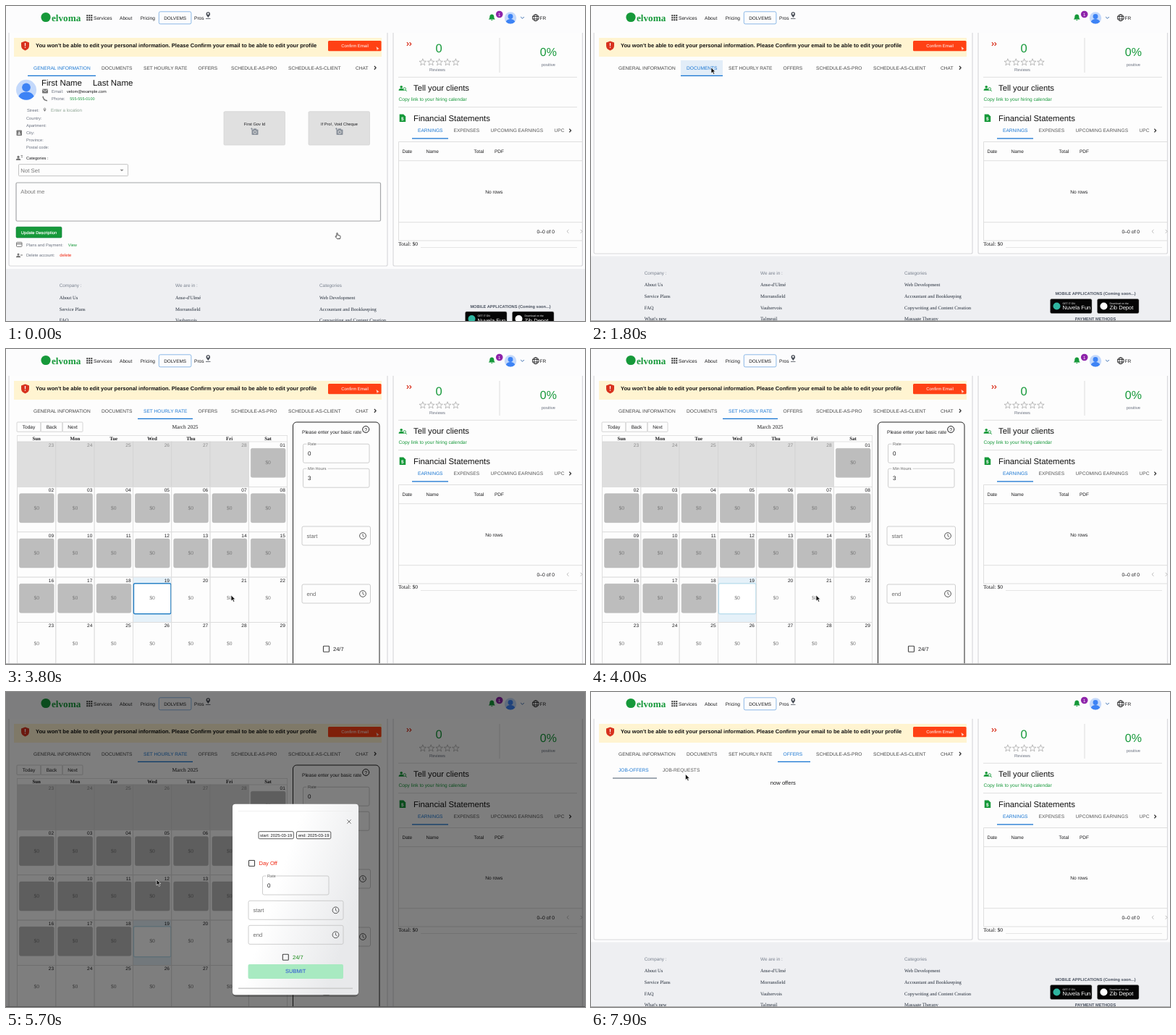
These frames come from a looping animation (800x435 px, 8 s). An HTML page:

```html
<!DOCTYPE html>
<html lang="en">
<head>
<meta charset="utf-8">
<title>Profile page</title>
<style>
html, body { margin: 0; width: 100%; height: 100%; overflow: hidden; background: #fcfcfd; }
svg { display: block; width: 100vw; height: 100vh; font-family: "Liberation Sans", Arial, sans-serif; text-rendering: geometricPrecision; }
.serif { font-family: "Liberation Serif", "Times New Roman", serif; }
</style>
</head>
<body>
<svg id="stage" viewBox="0 0 800 435"></svg>
<script>
const GREEN = "#16993a", BLUE = "#1976d2", INK = "#1c1c1e", GREY = "#6b7280";
const LOOP = 8000;

// Drawing helpers
const text = (x, y, s, size, fill = INK, extra = "") =>
  `<text x="${x}" y="${y}" font-size="${size}" fill="${fill}" ${extra}>${s}</text>`;
const mid = (x, y, s, size, fill, extra = "") => text(x, y, s, size, fill, `text-anchor="middle" ${extra}`);
const serif = (x, y, s, size, fill, extra = "") => text(x, y, s, size, fill, `class="serif" ${extra}`);
const box = (x, y, w, h, fill = "none", stroke = "none", r = 0, sw = 1) =>
  `<rect x="${x}" y="${y}" width="${w}" height="${h}" rx="${r}" fill="${fill}" stroke="${stroke}" stroke-width="${sw}"/>`;
const dot = (x, y, r, fill, stroke = "none", sw = 1) =>
  `<circle cx="${x}" cy="${y}" r="${r}" fill="${fill}" stroke="${stroke}" stroke-width="${sw}"/>`;
const line = (d, stroke = "#ddd", sw = 1) => `<path d="${d}" fill="none" stroke="${stroke}" stroke-width="${sw}"/>`;
const shape = (d, fill) => `<path d="${d}" fill="${fill}"/>`;
const group = (id, inner, extra = "") => `<g id="${id}" ${extra}>${inner}</g>`;
const range = n => [...Array(n).keys()];

// Icons
const chevron = (x, y, w, h, color, sw = 1.3) => line(`M${x - w} ${y - h}l${2 * w} ${h}l${-2 * w} ${h}`, color, sw);
const pin = (x, y, s, color) => dot(x, y - s * .2, s * .45, "none", color, s * .32) +
  shape(`M${x - s * .6} ${y}h${s * 1.2}l${-s * .6} ${s}z`, color);
const person = (x, y, s, color) => dot(x, y - s * .5, s * .5, color) +
  shape(`M${x - s} ${y + s * .9}q0 ${-s * .8} ${s} ${-s * .8}t${s} ${s * .8}z`, color);
const avatar = (x, y, r) => dot(x, y, r, "#c4d9fb") + dot(x, y - r * .25, r * .42, "#3d83f5") +
  shape(`M${x - r * .76} ${y + r * .64}q${r * .2} ${-r * .45} ${r * .76} ${-r * .45}t${r * .76} ${r * .45}a${r} ${r} 0 0 1 ${-r * 1.52} 0`, "#3d83f5");
const clock = (x, y) => dot(x, y, 4.4, "none", "#555", 1) + line(`M${x} ${y - 2.8}v3l2 1.4`, "#555", .9);
const camera = (x, y) => box(x - 4.5, y - 3, 9, 7.5, "#8b929c", "none", 1) + box(x - 2, y - 4.2, 4, 2, "#8b929c") +
  dot(x, y + .8, 2, "none", "#e0e0e0", .9) + line(`M${x - 6} ${y - 4}h3m-1.5 -1.5v3`, "#8b929c", .8);
const star = (x, y) => line("M" + range(10).map(i => {
  const a = i * Math.PI / 5, r = i % 2 ? 2.1 : 5;
  return `${(x + r * Math.sin(a)).toFixed(2)} ${(y - r * Math.cos(a)).toFixed(2)}`;
}).join("L") + "z", "#a0a0a0", .7);
const check = (x, y) => box(x, y, 8, 8, "none", "#444", .8, 1.1);
const field = (x, y, w, label, value) => box(x, y, w, 26, "none", "#c2c2c2", 2, .8) +
  box(x + 5, y - 2, label.length * 3 + 2, 4, "#fdfdfd") + text(x + 6.5, y + 1.8, label, 5.6, "#666") + text(x + 6.5, y + 16, value, 8);
const timeField = (x, y, w, label) => box(x, y, w, 26, "none", "#c2c2c2", 2, .8) +
  text(x + 6.5, y + 15.7, label, 7.7, "#6a6a6a") + clock(x + w - 10.5, y + 13);

const tabs = [
  { x: 30, w: 94, tx: 38, name: "GENERAL INFORMATION" },
  { x: 124, w: 58, tx: 132, name: "DOCUMENTS" },
  { x: 182, w: 76, tx: 190, name: "SET HOURLY RATE" },
  { x: 258, w: 45, tx: 265.5, name: "OFFERS" },
  { x: 303, w: 80, tx: 311, name: "SCHEDULE-AS-PRO" },
  { x: 382, w: 89, tx: 390, name: "SCHEDULE-AS-CLIENT" },
  { x: 475, w: 30, tx: 483, name: "CHAT" }
];

function header() {
  const grid = range(9).map(i => box(111.3 + i % 3 * 3, 12.2 + (i / 3 | 0) * 3, 2, 2, "#333")).join("");
  return dot(55, 15.5, 6.6, GREEN) + serif(63, 20.5, "elvoma", 13.2, GREEN, 'font-weight="bold"') +
    grid + text(121, 18.6, "Services", 6.65) + text(157, 18.6, "About", 6.6) + text(185.7, 18.6, "Pricing", 6.6) +
    box(211.3, 7.8, 44.6, 17, "none", "#7fb2e5", 2, .9) + mid(233.6, 18.6, "DOLVEMS", 6.4) +
    text(260, 18.6, "Pros", 6.6) + pin(279.3, 11.8, 4.5, "#4a4f58") + line("M276 17.5h6.5", "#4a4f58", .8) +
    shape("M666.8 18.6q1.5-1 1.5-3.6q0-3 3-3.4q3 .4 3 3.4q0 2.600 1.500 3.600zM670 19.200h2.600q-1.300 2-2.600 0", GREEN) +
    dot(681.7, 11.5, 4.8, "#8e24aa") + mid(681.7, 13.8, "1", 6, "#fff") + avatar(697, 16.5, 8.2) +
    line("M711.2 15l2.300 2.300l2.300-2.300", "#3c6fb0", 1) +
    dot(731.8, 16.2, 4.4, "none", INK, .9) + line("M727.500 14.500h8.600m-8.600 3.400h8.600", INK, .8) +
    `<ellipse cx="731.8" cy="16.2" rx="2" ry="4.4" fill="none" stroke="${INK}" stroke-width=".8"/>` + text(737.6, 18.7, "FR", 6.5);
}

function bannerAndTabs() {
  return box(11, 44, 508, 26, "#fff4d1") +
    shape("M21 50.500l5.500-2l5.500 2v4.500q0 4.500-5.500 6.500q-5.500-2-5.500-6.500z", "#d8321e") +
    line("M26.500 51v4.300m0 1.200v1.300", "#fff", 1.2) +
    text(41, 57, "You won't be able to edit your personal information. Please Confirm your email to be able to edit your profile", 7.55, "#111", 'font-weight="bold"') +
    box(445, 48, 73.600, 14.200, "#ff4114", "none", 1.500) + mid(482, 57.300, "Confirm Email", 6, "#fff") +
    shape("M511.500 56l4.200 3.200l-2 .3l-.8 2z", "#ffd9ce") +
    `<clipPath id="tabClip"><rect id="tabArea" y="75" height="21.500"/></clipPath>` +
    `<circle id="ripple" fill="${BLUE}" clip-path="url(#tabClip)"/>` +
    tabs.map((t, i) => text(t.tx, 87.600, t.name, 6.600, "#555", `id="tab${i}"`)).join("") +
    chevron(510, 85.300, 1.100, 2.400, "#333") +
    `<rect id="indicator" y="95.700" height="1.300" fill="${BLUE}"/>`;
}

function general() {
  const upload = (x, label) => box(x, 145.700, 84.500, 46.300, "#e0e0e0", "#d2d2d2", 1.500, .700) +
    mid(x + 42.500, 164.500, label, 5.700) + camera(x + 43, 173.500);
  const labels = ["Country:", "Apartment:", "City:", "Province:", "Postal code:"];
  return avatar(28, 115.800, 14) + text(49, 110, "First Name", 11.450, "#111") + text(120, 110, "Last Name", 11.450, "#111") +
    box(50, 114.500, 8, 6, "#777", "none", .800) + line("M50.500 115.500l3.500 2.500l3.500-2.500", "#fff", .800) +
    text(63, 119.700, "Email:", 5.900, GREY) + text(84, 119.700, "velom@example.com", 5.700) +
    line("M51 124.800q.5 5.500 6 6", "#777", 1.600) + text(63, 129.700, "Phone:", 5.900, GREY) + text(88.300, 129.700, "555-555-0100", 5.500, GREEN) +
    text(29, 145.500, "Street:", 5.700, GREY) + pin(53.500, 143, 3, "#888") + text(62, 145.600, "Enter a location", 6.200, "#90a796") +
    labels.map((s, i) => text(28, 157 + i * 9.900, s, 5.700, GREY)).join("") +
    box(14.500, 171.500, 7.500, 7.500, "#777", "none", .800) + person(18.200, 175.500, 2.100, "#fff") +
    person(17, 210, 3.200, "#777") + line("M20.500 206.500h2.500m-2 2h2", "#777", .900) +
    text(28, 211.500, "Categories :", 5.660) +
    box(17.500, 218.700, 151, 16, "none", "#bdbdbd", 1, .900) + text(20.300, 229.500, "Not Set", 7.800, "#777") + shape("M157.500 225.800h5l-2.500 2.500z", "#888") +
    box(14, 244, 503.500, 53, "#fdfdfd", "#a4a6a8", 1.500, 1.200) + text(20.300, 259.300, "About me", 7.700, "#777") +
    box(14, 305, 63, 15, GREEN, "#0c7a3c", 1.500, .600) + mid(45.500, 314.600, "Update Description", 5.800, "#fff", 'stroke="#fff" stroke-width=".15"') +
    box(14.500, 326.300, 7.500, 6, "none", "#777", .800, 1) + line("M14.500 328.500h7.500", "#777", 1.300) +
    text(28, 331.700, "Plans and Payment:", 5.700, GREY) + text(85.700, 331.700, "View", 5.700, GREEN) +
    person(17, 344.500, 3, "#777") + line("M20 344h3", "#777", 1) +
    text(28, 346.300, "Delete account:", 5.700, GREY) + text(74.300, 346.300, "delete", 5.900, "#f0220c") +
    upload(301, "First Gov Id") + upload(418, "If Pro!, Void Cheque");
}

function calendar() {
  const left = 15.500, top = 128, cw = 53.300, rh = 62.350;
  const two = n => String(n).padStart(2, "0");
  let out = ["Today", "Back", "Next"].map((s, i) => {
    const x = [15, 48, 78, 106];
    return box(x[i], 101, x[i + 1] - x[i], 13.300, "none", "#ccc", 1, .800) + mid((x[i] + x[i + 1]) / 2, 109.800, s, 6.600);
  }).join("");
  out += mid(247.500, 109.700, "March 2025", 7.450, INK, 'class="serif"');
  for (const i of range(35)) {
    const col = i % 7, row = i / 7 | 0, x = left + col * cw, y = top + row * rh;
    const outside = i < 6, today = i === 24, past = i >= 6 && i < 24;
    const day = outside ? 23 + i : i - 5;
    out += box(x, y, cw, rh, outside ? "#dedede" : today ? "#e5f1f9" : "none", outside ? "#d2d2d2" : "#ddd", 0, .800);
    out += text(x + cw - 2.800, y + 6.800, two(day), 6.500, outside ? "#888" : INK, 'text-anchor="end"');
    if (past) out += box(x + 3, y + 9.300, 47.700, 40, "#bdbdbd", "#b2b2b2", 2, .500);
    if (today) out += `<rect id="today" x="${x + 1}" y="${y + 8.800}" width="51.500" height="42" rx="2" fill="#fff" stroke-width="1.500"/>`;
    if (!outside) out += mid(x + cw / 2, y + 31.300, "$0", 7.500, "#777", 'class="serif"');
  }
  out += box(left, 119.500, cw * 7, 320, "none", "#ddd", 0, .800);
  out += ["Sun", "Mon", "Tue", "Wed", "Thu", "Fri", "Sat"].map((s, i) =>
    mid(left + (i + .5) * cw, 126, s, 6.900, INK, 'class="serif" font-weight="bold"')).join("");
  return out + box(396.500, 101, 119.500, 400, "none", "#222", 5) +
    text(409, 116.500, "Please enter your basic rate", 6.600) +
    dot(497.200, 111, 4.500, "none", INK, 1) + mid(497.200, 113.700, "?", 7) +
    field(410.500, 131.200, 91.500, "Rate", "0") + field(410.500, 165.200, 91.500, "Min Hours", "3") +
    timeField(409, 245, 94.500, "start") + timeField(409, 325, 94.500, "end") +
    check(438.500, 410.300) + text(452, 417.200, "24/7", 7.500);
}

function offers() {
  return text(38, 110.200, "JOB-OFFERS", 6.600, BLUE) + text(99, 110.200, "JOB-REQUESTS", 6.600, "#555") +
    box(30, 118.500, 61, 1, "#45566b") + mid(265.300, 127.600, "now offers", 7.600);
}

function rightPanel() {
  return [555, 558.700].map(x => chevron(x, 52.500, 1.100, 2.400, "#d8321e", 1.200)).join("") +
    mid(598, 63.800, "0", 16.500, GREEN) + range(5).map(i => star(575.800 + i * 11.400, 77.800)).join("") +
    mid(596, 89.600, "Reviews", 5.800, GREY) + line("M682 44v48") +
    mid(749.300, 69, "0%", 16, GREEN) + mid(749.300, 83.300, "positive", 5.700, GREY) +
    line("M542 98.300h247M542 139.700h247", "#ddd", .900) +
    person(546.200, 113.500, 3.600, GREEN) + dot(550.700, 114.500, 1.800, "#fdfdfd", GREEN, .900) + line("M552 116l1.700 1.700", GREEN, 1) +
    text(563, 117, "Tell your clients", 11.250, "#111") + text(542.500, 131, "Copy link to your hiring calendar", 6.600, GREEN) +
    shape("M543.700 149.500h5.500l3 3v7.500h-8.500z", GREEN) + mid(547.900, 158, "$", 6.500, "#fff", 'font-weight="bold"') +
    text(563, 158.600, "Financial Statements", 11.350, "#111") +
    text(569, 174, "EARNINGS", 6.600, BLUE) + text(618.500, 174, "EXPENSES", 6.600, "#555") +
    text(669.500, 174, "UPCOMING EARNINGS", 6.600, "#555") + text(757.500, 174, "UPC", 6.600, "#555") +
    chevron(779.500, 172, 1.100, 2.400, "#333") + box(561, 182.300, 50, 1.300, BLUE) +
    line("M797 187.500h-254.500v136.500h254.500M542.500 213.700h254.500M542.500 298.700h254.500", "#dcdcdc", .900) +
    [["Date", 547.500], ["Name", 580.500], ["Total", 646.500], ["PDF", 675]].map(([s, x]) => text(x, 203, s, 6.500)).join("") +
    mid(674.300, 259, "No rows", 6.600) + text(733.500, 313.700, "0–0 of 0", 6.800) +
    line("M777.500 308.900l-2.500 2.400l2.500 2.400", "#bbb", 1) + chevron(795, 311.300, 1.200, 2.400, "#bbb", 1) +
    serif(542, 331, "Total: $0", 7.550) + line("M573 333.500h216", "#e0e0e0", .800);
}

function footer() {
  const columns = [
    [73.700, "Company :", "About Us", "Service Plans", "FAQ", "What's new"],
    [234, "We are in :", "Anse-d'Ulmé", "Morransfield", "Vauhervois", "Talmeuil"],
    [433, "Categories", "Web Development", "Accountant and Bookkeeping", "Copywriting and Content Creation", "Massage Therapy"]
  ];
  const badge = (x, small, name, mark) => box(x, 422, 57.500, 20, "#050505", "#888", 2, .500) + dot(x + 9, 432, 5, mark) +
    text(x + 17, 429, small, 3.500, "#fff") + text(x + 17, 436.800, name, 7.600, "#fff");
  return box(0, 363, 800, 100, "#eeeff2") + columns.map(([x, title, ...items]) =>
    text(x, 388.300, title, 6.400, "#7a828f") + items.map((s, i) => serif(x, 404.800 + i * 15.700, s, 6.650, "#222b38")).join("")).join("") +
    mid(697, 416.600, "MOBILE APPLICATIONS (Coming soon...)", 5.660, "#4a5260", 'font-weight="bold"') +
    badge(634.500, "GET IT ON", "Nuvela Fun", "#2fb5a0") + badge(699.500, "Download on the", "Zib Depot", "#fff") +
    mid(697, 451.700, "PAYMENT METHODS", 5.660, "#4a5260", 'font-weight="bold"');
}

function modal() {
  return box(0, 0, 800, 435, "rgba(0,0,0,.5)") + box(313, 157, 174, 264, "rgba(0,0,0,.25)", "none", 5) +
    box(313, 154.700, 174, 263.500, "url(#paper)", "none", 4) +
    line("M471.300 176.300l5.400 5.400m0-5.400l-5.400 5.400", "#777", 1) + line("M321 164.500h158", "#eee", .800) +
    [[349, 48.300, "start"], [401.500, 47.300, "end"]].map(([x, w, s]) => box(x, 192.700, w, 10, "none", "#333", 1.500, .800) +
      mid(x + w / 2, 199.800, "", 5.800, INK, `id="${s}Date"`)).join("") +
    check(335.500, 232.500) + text(349.500, 239.200, "Day Off", 7.500, "#f0220c") +
    field(354.500, 254, 91.500, "Rate", "0") + timeField(335, 288.300, 131, "start") + timeField(335, 322.300, 131, "end") +
    check(382.300, 362.200) + text(396, 369, "24/7", 7.500, "#178a17") +
    box(334.500, 376, 131.500, 20, "#a8eac1", "none", 2) + mid(400.200, 388.300, "SUBMIT", 7.500, "#2348d6") + box(321, 408.500, 158, 1.600, "#ccc");
}

const stage = document.getElementById("stage");
const panel = (id, x, w) => `<rect id="${id}" x="${x}" y="30" width="${w}" rx="2" fill="#fdfdfd" stroke="#d9d9dc" stroke-width="1.200"/>`;
stage.innerHTML = `<defs>
  <linearGradient id="paper" x2="1" y2=".5"><stop offset=".45" stop-color="#fff"/><stop offset="1" stop-color="#e8e9eb"/></linearGradient>
  <clipPath id="leftClip"><rect x="4" y="36" width="523" height="400"/></clipPath></defs>` +
  box(0, 0, 800, 435, "#fcfcfd") + panel("leftPanel", 4, 523) + panel("rightPanel", 535, 261.500) +
  box(0, 0, 800, 37, "#fcfcfd") + header() +
  `<g clip-path="url(#leftClip)">` + group("general", general()) + group("calendar", calendar()) + group("offers", offers()) + `</g>` +
  bannerAndTabs() + rightPanel() + group("footer", footer()) +
  group("bottomLine", box(0, 434, 800, 1, "#aaa")) + group("modal", modal()) +
  group("arrow", shape("M0 0v8l1.900-1.700l1.400 3l1.400-.7l-1.400-2.900h2.500z", "#111"), 'stroke="#fff" stroke-width=".6"') +
  group("hand", `<path d="M-1.500 7.500l-1.500-2.300q.5-1 1.800.1v-4.500q.8-1 1.500 0v2.500l3 .8q1 .3.800 1.500l-.6 2.900h-4z" fill="#fff" stroke="#222" stroke-width=".8"/>`);

const el = id => document.getElementById(id);
const set = (id, attrs) => { for (const k in attrs) el(id).setAttribute(k, attrs[k]); };
const show = (id, on) => set(id, { display: on ? "inline" : "none" });
const clamp = v => Math.max(0, Math.min(1, v));
const smooth = v => (v = clamp(v), v * v * (3 - 2 * v));
const mix = (a, b, p) => a + (b - a) * p;

// Timeline: tab selections, dialogs and pointer stops
const picks = [[-1000, 0], [1500, 1], [2420, 2], [6800, 3]];
const dialogs = [[4000, 4500, "2025-03-21"], [5300, 5900, "2025-03-19"]];
const stops = [[0, 458, 313], [350, 458, 313], [1050, 174, 86], [1600, 166, 85], [1850, 166, 85], [2350, 212, 84.500],
  [2700, 212, 84.500], [3700, 311, 340], [4000, 311, 340], [4400, 247, 305], [4800, 247, 305], [5200, 204, 340],
  [5300, 204, 340], [5650, 208, 259], [5900, 208, 259], [6650, 279, 84], [6950, 279, 84], [7850, 130.500, 113.500], [LOOP, 130.500, 113.500]];

function pointer(t) {
  const i = stops.findIndex((s, k) => k && t <= s[0]);
  const [t0, x0, y0] = stops[i - 1], [t1, x1, y1] = stops[i];
  const p = smooth((t - t0) / (t1 - t0));
  return `translate(${mix(x0, x1, p)} ${mix(y0, y1, p)})`;
}

function settle(id, p) {
  const s = 1.1 - .1 * p;
  set(id, { opacity: p, transform: `translate(265 283) scale(${s}) translate(-265 -283)` });
}

function draw(t) {
  let n = 0;
  picks.forEach(([start], i) => { if (t >= start) n = i; });
  const [start, active] = picks[n];
  const tab = tabs[active], from = tabs[picks[Math.max(0, n - 1)][1]];
  const age = t - start, slide = 1 - Math.pow(1 - clamp(age / 300), 2.3);
  set("indicator", { x: mix(from.x, tab.x, slide), width: mix(from.w, tab.w, slide) });
  tabs.forEach((_, i) => set("tab" + i, { fill: i === active ? BLUE : "#444" }));
  set("tabArea", { x: tab.x, width: tab.w });
  set("ripple", { cx: tab.x + 31, cy: 88, r: 80 * smooth(age / 350), opacity: n ? .14 * (1 - clamp((age - 250) / 300)) : 0 });

  show("general", active === 0);
  show("calendar", active === 2);
  show("offers", active === 3);
  settle("calendar", smooth((t - 2450) / 1000));
  settle("offers", smooth((t - 6830) / 900));

  const tall = active === 2, short = active % 2;
  const height = tall ? 420 : short ? 312 : 329;
  set("leftPanel", { height });
  set("rightPanel", { height });
  show("footer", !tall);
  set("footer", { transform: `translate(0 ${short ? -17.500 : 0})` });
  show("bottomLine", active > 0);

  const dialog = dialogs.find(([a, b]) => t >= a && t < b + 200);
  show("modal", dialog);
  set("today", { stroke: dialog ? "#bfe0ee" : "#2b83c6" });
  if (dialog) {
    const [open, close, date] = dialog;
    set("modal", { opacity: smooth((t - open) / 220) * (1 - smooth((t - close) / 200)) });
    el("startDate").textContent = "start: " + date;
    el("endDate").textContent = "end: " + date;
  }

  const move = pointer(t), hand = t < 400;
  show("hand", hand);
  show("arrow", !hand);
  set("hand", { transform: move });
  set("arrow", { transform: move });
}

const begin = performance.now();
function tick(now) {
  draw(Math.max(0, now - begin) % LOOP);
  requestAnimationFrame(tick);
}
draw(0);
requestAnimationFrame(tick);
</script>
</body>
</html>
```
